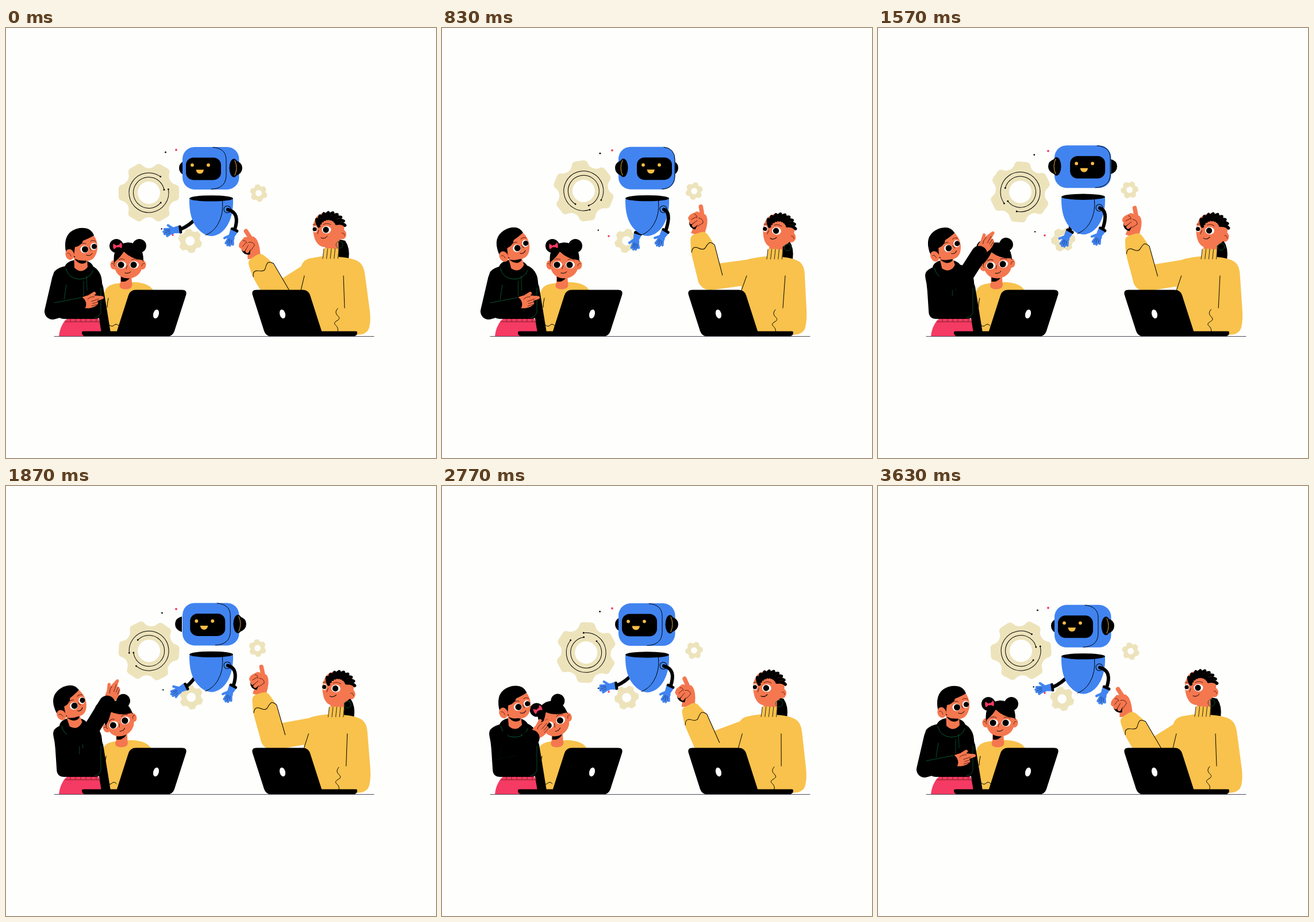
Write an HTML page with a canvas that moves like this. It is 748 by 748 pixels and loops after 3.66 s.

```html
<!DOCTYPE html>
<html lang="en">
<head>
<meta charset="utf-8">
<title>Robot lesson</title>
<style>
html, body { margin: 0; width: 100%; height: 100%; overflow: hidden; background: #fefefd; }
canvas { display: block; width: 748px; height: 748px; }
</style>
</head>
<body>
<canvas id="stage"></canvas>
<script>
const LOOP = 3660, SIZE = 748, TAU = Math.PI * 2;
const BG = '#fefefd', INK = '#000', SKIN = '#f4774f', YELLOW = '#f8c24c', BLUE = '#4184f0',
  PINK = '#f53a63', SAND = '#ede3bb', GREEN = '#0c5c34', BROWN = '#5a1d14', GOLD = '#f9bd45';

const canvas = document.getElementById('stage');
const dpr = window.devicePixelRatio || 1;
canvas.width = canvas.height = SIZE * dpr;
const c = canvas.getContext('2d');
c.scale(dpr, dpr);
c.lineCap = c.lineJoin = 'round';

// Timing
const clamp = v => Math.min(1, Math.max(0, v));
const lerp = (a, b, k) => a + (b - a) * k;
const mix = (a, b, k) => a.map((v, i) => lerp(v, b[i], k));
const rad = deg => deg * Math.PI / 180;
const polar = (r, deg) => [Math.cos(rad(deg)) * r, Math.sin(rad(deg)) * r];

function ramp(t, from, to) {
  const k = clamp((t - from) / (to - from));
  return k * k * (3 - 2 * k);
}

// Rises, stays, then falls back
const hold = (t, up, top, down, end) => ramp(t, up, top) - ramp(t, down, end);
const blink = (t, mid) => clamp(Math.abs(t - mid) / 70 - 0.6);
// Slow float, once per loop
const sway = (t, shift = 0) => Math.cos(TAU * (t / LOOP - shift));

// Drawing
function fill(d, color) {
  c.fillStyle = color;
  c.fill(new Path2D(d));
}

function line(d, color = INK, width = 1) {
  c.strokeStyle = color;
  c.lineWidth = width;
  c.stroke(new Path2D(d));
}

function oval(x, y, rx, ry, color, turn = 0) {
  c.beginPath();
  c.ellipse(x, y, rx, ry, turn, 0, TAU);
  c.fillStyle = color;
  c.fill();
}

const dot = (x, y, r, color) => oval(x, y, r, r, color);

function box(x, y, w, h, r, color) {
  c.beginPath();
  c.roundRect(x, y, w, h, r);
  c.fillStyle = color;
  c.fill();
}

// Polygon with softened corners
function soft(pts, r, color) {
  const n = pts.length;
  const toward = (p, q) => mix(p, q, Math.min(r / Math.hypot(q[0] - p[0], q[1] - p[1]), 0.5));
  c.beginPath();
  pts.forEach((p, i) => {
    c.lineTo(...toward(p, pts[(i + n - 1) % n]));
    c.quadraticCurveTo(...p, ...toward(p, pts[(i + 1) % n]));
  });
  c.closePath();
  c.fillStyle = color;
  c.fill();
}

function group(x, y, deg, draw, px = 0, py = 0) {
  c.save();
  c.translate(x + px, y + py);
  c.rotate(rad(deg));
  c.translate(-px, -py);
  draw();
  c.restore();
}

function eye(x, y, rx, ry, pupil, open, dx = 0) {
  if (open < 0.2) return line(`M${x - rx} ${y}Q${x} ${y + 3} ${x + rx} ${y - 1}`, INK, 1.2);
  oval(x, y, rx, ry * open, '#fff');
  oval(x + dx, y, pupil, pupil * open, INK);
}

// Gears
function gear(x, y, r, hole, deg) {
  const pts = [];
  for (let tooth = 0; tooth < 360; tooth += 60) {
    for (const side of [-1, 1]) {
      const base = polar(r * 0.8, tooth + side * 22), tip = polar(r, tooth + side * 13);
      pts.push(...(side < 0 ? [base, tip] : [tip, base]));
    }
  }
  group(x, y, deg, () => {
    soft(pts, r * 0.1, SAND);
    dot(0, 0, hole, BG);
  });
}

function ring(r, from, to) {
  c.beginPath();
  c.arc(0, 0, r, rad(from), rad(to));
  c.strokeStyle = INK;
  c.lineWidth = 1;
  c.stroke();
  for (const end of [from, to]) dot(...polar(r, end), 1.4, INK);
}

function gears(t) {
  const spin = t / LOOP * 360, drift = sway(t, 0.25);
  const x = 248.5 - 2.2 * drift, y = 286.5 - 3.2 * drift;
  gear(x, y, 54, 19.5, spin);
  group(x, y, spin, () => {
    ring(34.5, -10, 306);
    ring(27, 40, 349);
  });
  gear(438.5 + sway(t), 284.6 + 3 * sway(t, -0.07), 15.5, 5.5, spin + 20);
  gear(321.2 - sway(t), 369 + 1.7 * sway(t, 0.1), 21.5, 8, spin + 20);
}

function dots(t) {
  const s = sway(t);
  dot(274.5 + 3 * s, 218.5 - 2.3 * s, 1.4, INK);
  dot(296, 213 - s, 1.9, PINK);
  dot(272 - 1.3 * s, 352 - 2.6 * s, 1.2, INK);
  dot(290, 360 + 2 * sway(t, 0.25), 1.8, PINK);
}

// Robot
function robotHand(x, y, deg) {
  group(x, y, deg, () => {
    line('M0 -4.5L0 4.5', INK, 5.5);
    fill('M2 -6.5L11 -5L11 5.5L2 7Z', BLUE);
    oval(15, 0, 6.5, 6.5, BLUE);
    line('M16 -4L24 -8M17 -1L28 -4M17 1L29 0M16 3L27 4M13 4L20 10', BLUE, 4.2);
    line('M18 -3L26 -6M18 0L27 -2M18 2L26 2', '#173a7c', 0.8);
  });
}

function ear(k) {
  const dx = 9 * Math.sin(Math.PI * k);
  fill(`M${399 + dx} 231Q${411 + dx} 234 ${411 + dx} 244Q${411 + dx} 254 ${399 + dx} 258Z`, INK);
  if (k >= 0.5) return;
  oval(396.5 + dx, 244, 8, 16, INK);
  line(`M${398 + dx} 231Q${404 + dx} 244 ${398 + dx} 257`, GOLD, 0.9);
}

function ears(k, front) {
  if ((k < 0.5) === front) return ear(k);
  c.save();
  c.translate(712, 0);
  c.scale(-1, 1);
  ear(1 - k);
  c.restore();
}

function robotHead(k) {
  const p = k * 26, seam = Math.min(383 + p, 405);
  ears(k, false);
  box(307, 207.5, 98.5, 74, 21, BLUE);
  line(`M${360 + p} 208Q${seam} 210 ${seam} 230L${seam} 258Q${seam - 1} 280 ${357 + p} 281`);
  group(p, 0, 0, () => {
    box(313, 226, 61, 39, 13, INK);
    dot(324, 239, 2.9, GOLD);
    dot(352, 239, 2.9, GOLD);
    fill('M330.5 247L344 247Q343 254 337.5 254Q331.5 254 330.5 247Z', GOLD);
  });
  ears(k, true);
}

function robot(t) {
  const k = hold(t, 120, 800, 1350, 2150);
  const left = mix([303, 351, 172], [341, 358, 106], k);
  const right = mix([397.5, 352, 115], [389, 354, 121], k);
  group(0, -2.3 + 2.1 * sway(t, 0.1), 0, () => {
    line(`M334 328Q${320 + 20 * k} 344 ${left[0]} ${left[1]}`, INK, 6);
    robotHand(...left);
    fill('M319 297Q318 332 333 349Q344 362 357 362.5Q372 362 383 347Q396 328 395 297Z', BLUE);
    oval(357, 297, 38, 5.2, INK);
    line('M376.5 301Q379 325 368 343Q360 356 347 361');
    dot(385, 316, 6.5, INK);
    dot(385, 316, 5.5, BLUE);
    line(`M386 316.5Q${408 - 8 * k} 322 ${right[0]} ${right[1]}`, INK, 6);
    robotHand(...right);
    robotHead(k);
  });
}

// Teacher on the right
function pointingHand() {
  fill('M-11 3L-10 -8L-22 -18Q-25 -24 -20 -29L-12 -36L4 -35Q11 -30 12 -14L12 3Z', SKIN);
  fill('M-20 -15Q-17 -4 -6 -5L-3 -18Z', INK);
  line('M-1 -32L-8 -46', SKIN, 7.5);
  line('M-10 -30L-20 -21M-7 -25L-16 -15M-3 -21L-10 -11', SKIN, 6.5);
  line('M-15 -30Q-10 -31 -9 -25M-17 -20L-11 -26M-13 -13L-7 -21M-6 -26Q2 -27 4 -20L-3 -12', BROWN, 0.9);
}

function teacherHead() {
  oval(585, 359, 7, 8.5, SKIN);
  fill('M537 334Q532 345 535 359Q539 379 553 381Q573 381 583 366Q592 350 586 334Q575 319 558 321Q542 322 537 334Z', SKIN);
  // Braids sweep back from the hairline
  for (let i = 0; i < 9; i++) {
    const a = -146 + i * 17;
    const [ox, oy] = polar(27, a), [mx, my] = polar(24, a - 14), [ix, iy] = polar(19 - i * 0.6, a - 24);
    line(`M${563 + ox} ${348 + oy}Q${563 + mx} ${348 + my} ${563 + ix} ${348 + iy}`, INK, 5.4);
  }
  oval(586, 360, 5, 7, SKIN);
  line('M584 357Q588 355 589 361', BROWN, 0.9);
  eye(537.5, 350, 3.8, 5.5, 3.6, 1, -0.5);
  eye(557.5, 351, 8, 6.5, 5.2, 1, -1);
  line('M534 342L540 341M552 342Q558 338 565 342M544 352L542 358', BROWN);
  line('M548 365Q554 368 559 362');
  line('M574 377A6 6 0 1 0 586 377A6 6 0 1 0 574 377', GREEN, 0.9);
}

// Forearm with the wrist at the origin
function sleeve() {
  soft([[-13, 0], [14, 0], [23, 28], [22, 86], [-22, 86], [-20, 28]], 8, YELLOW);
  line('M-19 29Q-14 18 -6 25T6 28T14 22T23 28L21.5 82');
}

function teacher(t) {
  const up = hold(t, 100, 800, 2450, 3050), ease = hold(t, 1250, 1800, 2450, 3050);
  const arm = up - 0.1 * ease, lean = up - 0.33 * ease;
  const wx = 431 + 13.5 * arm - 9 * Math.sin(Math.PI * arm), wy = 398 - 41 * arm;
  const bend = 32 - 16 * arm;
  const reach = polar(80, 90 - bend);
  const elbow = [wx + reach[0], wy + reach[1]];
  const neck = 14 * lean, chest = 8 * lean;

  fill(`M${577 + neck} 367l13 3q9 13 6 33l-19 -1Z`, INK);
  group(wx, wy, bend - 39 + 24 * arm - (bend - 32), pointingHand);
  line(`M${elbow}L${545 + 2 * chest} 421`, YELLOW, 44);
  group(wx, wy, -bend, sleeve);
  soft([[513 + chest, 404], [552 + neck, 396], [602 + chest, 400], [622 + chest, 411],
    [635, 508], [629, 533], [515, 538], [513 + chest, 456]], 17, YELLOW);

  line(`M${519 + 11 * lean} 431L${513 + chest} 456M${587 + 10 * lean} 431L${589 + 4 * lean} 487`);
  group(3 * lean, 2 * lean, 0, () => line('M577 488C566 500 588 502 576 509S580 516 577 527'));

  group(neck, lean, 0, () => {
    fill('M557 368L578 364L579 390L554 390Z', SKIN);
    soft([[553, 383], [579, 384], [578, 404], [551, 401]], 3, YELLOW);
    for (let i = 0; i < 5; i++) line(`M${553 + i * 6.5} 384L${551 + i * 6.6} 401`, INK, 0.8);
  });
  group(24 * lean, 2.5 * lean, 7 * lean, teacherHead, 562, 355);
}

// Girl
function girlHead(open) {
  for (const x of [192, 232]) dot(x, 379, 12, INK);
  for (const x of [188, 237]) oval(x, 412, 6.5, 8, SKIN);
  fill('M188 410Q184 376 212 373Q240 374 239 406L212 414Z', INK);
  fill('M189 407Q198 400 205 389Q218 402 238 404Q239 427 222 434Q210 438 199 432Q187 424 189 407Z', SKIN);
  for (const x of [201, 223]) eye(x, 412, 8, 6.5, 5.6, open, -1);
  line('M196 403Q201 400 206 403M219 403Q225 400 230 404M211 413L209 419', BROWN);
  line('M207 426Q213 428 217 424');
  line('M184 410Q187 408 189 414M236 414Q237 408 241 410', BROWN, 0.9);
  fill('M194 380L187 375Q185 381 188 385ZM194 380L200 373Q203 378 201 383Z', PINK);
  dot(194.5, 379.5, 2.2, PINK);
}

function girl(t) {
  const duck = hold(t, 1300, 2100, 2560, 3500);
  const dx = -19 * duck;
  group(dx * 0.25, 0, 0, () => {
    fill('M171 463Q172 446 196 444L222 442Q250 443 257 458L258 530L171 530Z', YELLOW);
    line('M178 470Q176 478 176 486M179 516Q184 521 188 517T196 518');
  });
  group(dx * 0.5, 0, 0, () => {
    fill('M199 426L218 426L219 443Q222 454 208 454.5Q194 454 199 443Z', SKIN);
    fill('M200 428L218 430Q213 443 200 441Z', INK);
  });
  group(dx, 0, -27 * duck, () => girlHead(blink(t, 3070)), 212, 410);
}

// Boy
function boyHead(open) {
  fill('M118 393L141 400L142 416Q131 429 119 417Z', SKIN);
  fill('M119 401Q130 407 141 403L139 408Q128 414 119 401Z', INK);
  fill('M103 379Q102 353 128 348Q148 346 153 361L150 366Q134 372 124 382L120 399L108 397Q103 390 103 379Z', INK);
  fill('M120 381Q132 379 134 370Q142 367 153 361Q160 372 159 384Q156 404 142 405Q126 405 118 396Z', SKIN);
  oval(111, 394, 7.5, 9.5, SKIN, -0.3);
  line('M107 392Q111 390 113 397', BROWN, 0.9);
  eye(136.5, 385, 7, 6.5, 5.5, open, 1);
  eye(152.5, 380, 5.5, 6.2, 4.6, open, 1);
  line('M128 377Q133 373 139 375M147 371Q151 368 156 371M145 382L148 387', BROWN);
  line('M140 395Q146 398 150 392');
}

function boyHand() {
  fill('M-3 -9Q8 -13 18 -10L34 -6Q38 -4 35 -1L24 1L25 5Q22 11 8 11L-3 9Z', SKIN);
  line('M11 -9L21 -13', SKIN, 5.5);
  line('M14 0L27 -2M15 4L25 3M13 8L22 7M8 -5Q14 -9 20 -7', BROWN, 0.9);
}

function boyArm(lift, high, low) {
  // Elbow x, y, wrist x, y, hand angle
  let pose = mix([81, 493, 135, 478, -10], [148, 448, 182, 397, -42], lift);
  pose = mix(pose, [146, 427, 181, 370, -62], high);
  pose = mix(pose, [143, 456, 176, 413, -66], low);
  const [ex, ey, wx, wy, turn] = pose;
  group(wx, wy, turn, boyHand);
  const [px, py] = mix([wx, wy], [ex, ey], 10 / Math.hypot(wx - ex, wy - ey));
  line(`M${94 + 18 * lift} ${437 + 8 * lift}L${ex} ${ey}L${px} ${py}`, INK, 28);
  c.globalAlpha = clamp(1 - lift * 2);
  line('M84 478L131 469M105 447L101 472', GREEN, 0.9);
  c.globalAlpha = 1;
}

function boy(t) {
  const glance = hold(t, 250, 750, 850, 1220);
  const lift = hold(t, 850, 1220, 2480, 3000);
  const high = hold(t, 1320, 1850, 1950, 2400);
  const low = hold(t, 1950, 2400, 2480, 3000);
  const open = Math.min(blink(t, 1230), blink(t, 2510));
  const hx = -6 * glance - 11 * lift - 7 * high;

  fill('M98 516Q104 504 112 504L160 504Q168 520 168 537L92 537Q93 525 98 516Z', PINK);
  line('M103 511L164 511', BROWN, 0.8);
  for (let x = 112; x < 160; x += 9) line(`M${x} 504L${x} 510`, BROWN, 0.8);
  fill('M158 420L169 450L182 530L166 530L156 470Z', INK);
  soft([[98, 414], [150, 411], [166, 428], [169, 470], [166, 506], [89, 506], [85, 445], [80, 425]], 12, INK);
  oval(127 + hx * 0.5, 417, 25, 14, INK);

  group(hx, 0, -13 * glance - 7 * lift - 10 * high, () => boyHead(open), 128, 385);
  group(hx * 0.4, 0, 0, () => {
    line('M104 418Q108 436 128 437Q147 436 151 422', GREEN);
    line('M135 440L135 466M140 431L141 456', GREEN, 0.8);
  });
  line('M165 452L165 494Q163 503 154 504', GREEN, 0.8);
  boyArm(lift, high, low);
}

// Desk
function laptop(x, base, slant) {
  const skew = slant * 26;
  soft([[x - 50 + skew / 2, 455.5], [x + 50 + skew / 2, 455.5],
    [x + 50 - skew / 2, 536.5], [x - 50 - skew / 2, 536.5]], 10, INK);
  box(base, 527.5, 91, 9, [3, 3, 8, 8], INK);
  oval(x + slant * 8, 497.5, 4.8, 8, '#fff', slant * 0.25);
}

function draw(t) {
  c.fillStyle = BG;
  c.fillRect(0, 0, SIZE, SIZE);
  gears(t);
  dots(t);
  robot(t);
  teacher(t);
  girl(t);
  boy(t);
  laptop(253, 132, 1);
  laptop(489, 520, -1);
  line('M84 536.5L640 536.5', '#4c4c58');
}

const start = performance.now();
function tick() {
  draw((performance.now() - start) % LOOP);
  requestAnimationFrame(tick);
}
tick();
</script>
</body>
</html>
```
